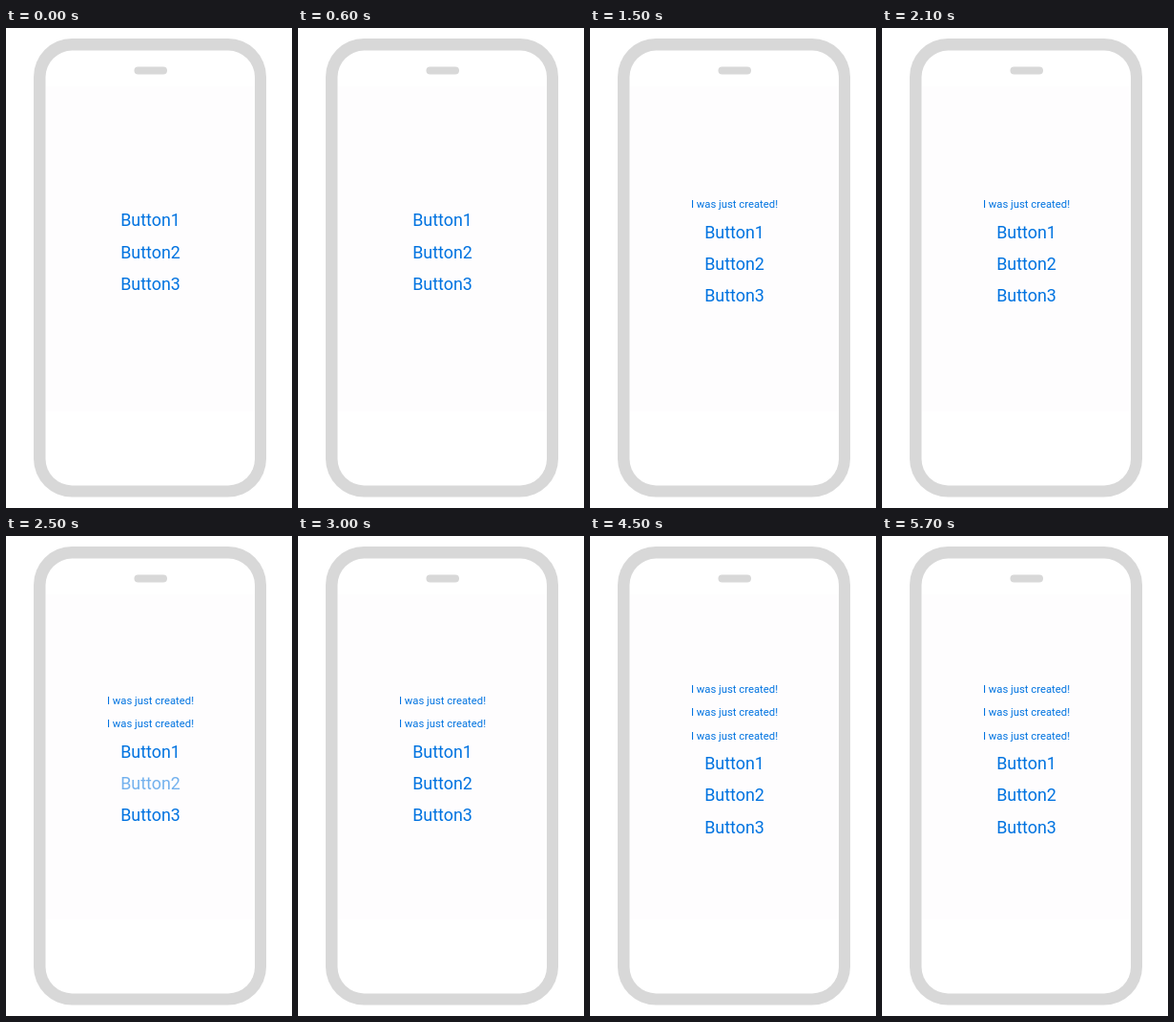
These frames come from a looping animation (300 by 502 pixels, 6500 ms). An HTML page with a canvas:

```html
<!DOCTYPE html>
<html lang="en">
<head>
<meta charset="utf-8">
<title>Buttons adding labels</title>
<style>
  html, body { margin: 0; width: 100%; height: 100%; overflow: hidden; background: #fff; }
  canvas { display: block; width: 300px; height: 502px; }
</style>
</head>
<body>
<canvas id="stage"></canvas>
<script>
const W = 300, H = 502, LOOP = 6500;
const BLUE = '#0073e0', GREY = '#d8d8d8';
const CENTER = 151.5, LABEL_STEP = 24.5, BUTTON_STEP = 33.3;

// Each state holds until the next one; fade maps an item to its opacity.
const states = [
  { at: 0, labels: 0 },
  { at: 1000, labels: 0, fade: { button0: 0.2 } },
  { at: 1500, labels: 1 },
  { at: 2500, labels: 2, fade: { button1: 0.55 } },
  { at: 3000, labels: 2 },
  { at: 4000, labels: 3, fade: { label2: 0.68 } },
  { at: 4500, labels: 3 }
];

const canvas = document.getElementById('stage');
const ctx = canvas.getContext('2d');
const ratio = window.devicePixelRatio || 1;
canvas.width = Math.round(W * ratio);
canvas.height = Math.round(H * ratio);
ctx.scale(ratio, ratio);

function pill(x, y, w, h, r, color) {
  ctx.fillStyle = color;
  ctx.beginPath();
  ctx.roundRect(x, y, w, h, r);
  ctx.fill();
}

function text(str, size, y, alpha = 1) {
  ctx.globalAlpha = alpha;
  ctx.font = `${size}px Roboto, sans-serif`;
  ctx.fillStyle = BLUE;
  ctx.fillText(str, CENTER, y);
  ctx.globalAlpha = 1;
}

function drawPhone() {
  ctx.fillStyle = '#fff';
  ctx.fillRect(0, 0, W, H);
  pill(29, 11, 244, 479.5, 40, GREY);
  pill(41.5, 23.5, 219.5, 455, 28, '#fff');
  ctx.fillStyle = '#fefdfe';
  ctx.fillRect(42, 61, 218.5, 340);
  pill(134.5, 40.5, 34.5, 8, 4, GREY);
}

function draw({ labels, fade = {} }) {
  const shift = labels * LABEL_STEP / 2;
  drawPhone();
  ctx.textAlign = 'center';
  for (let i = 0; i < labels; i++) {
    text('I was just created!', 11.3, 200.35 - shift + i * LABEL_STEP, fade['label' + i]);
  }
  for (let i = 0; i < 3; i++) {
    text('Button' + (i + 1), 17.9, 207.3 + shift + i * BUTTON_STEP, fade['button' + i]);
  }
}

const start = performance.now();
function tick() {
  const t = (performance.now() - start) % LOOP;
  draw(states.findLast(s => s.at <= t) || states[0]);
  requestAnimationFrame(tick);
}
tick();
</script>
</body>
</html>
```
